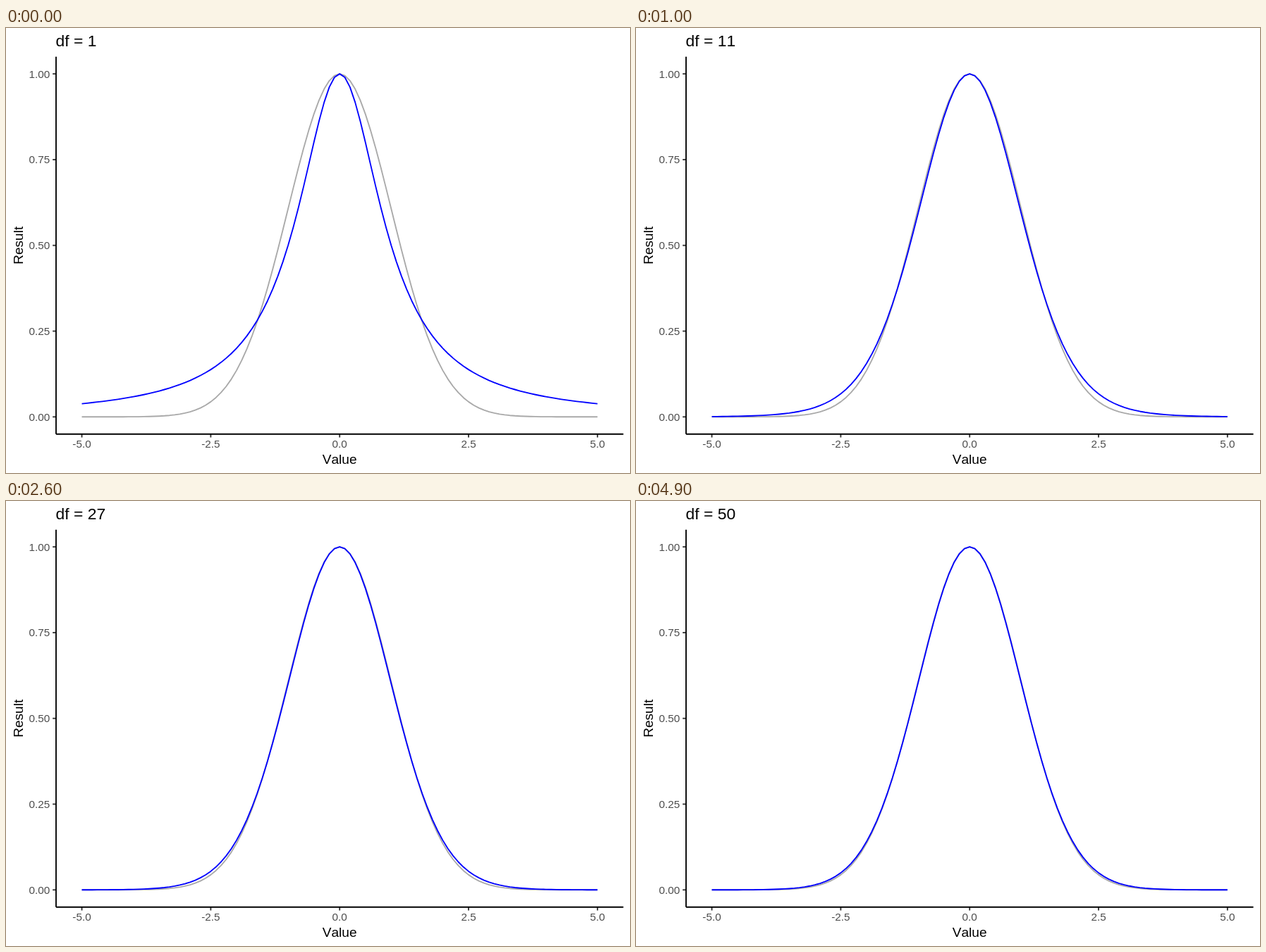
Write an HTML page that moves like this. It is 885 by 632 pixels and loops after 5 s.

```html
<!DOCTYPE html>
<html lang="en">
<head>
<meta charset="utf-8">
<title>Student t against normal</title>
<style>
html, body { margin: 0; width: 100%; height: 100%; overflow: hidden; background: #fff; }
svg { display: block; font: 15.3px "Liberation Sans", Arial, sans-serif; font-kerning: none; }
path { fill: none; stroke-width: 1.86; stroke-linejoin: round; }
#ticks text { fill: #4d4d4d; }
.label { font-size: 19.1px; text-anchor: middle; }
</style>
</head>
<body>
<svg width="885" height="632" viewBox="0 0 885 632">
  <path id="normal" stroke="#a9a9a9"/>
  <path id="student" stroke="#00f"/>
  <g id="ticks"></g>
  <path stroke="#000" d="M71 40.8V576.7M71 576.7H875.6"/>
  <text id="title" x="70.6" y="26" font-size="22.9"></text>
  <text class="label" x="473.2" y="619">Value</text>
  <text class="label" transform="translate(23.6 308.8) rotate(-90)">Result</text>
</svg>
<script>
const $ = id => document.getElementById(id);
const px = x => 473.2 + x * 73.13;
const py = y => 552.3 - y * 487.15;

function plot(id, f) {
  const points = Array.from({ length: 101 }, (_, i) => {
    const x = (i - 50) / 10;
    return px(x).toFixed(2) + ' ' + py(f(x)).toFixed(2);
  });
  $(id).setAttribute('d', 'M' + points.join('L'));
}

const tick = (d, x, y, anchor, label) =>
  `<path stroke="#333" d="${d}"/><text x="${x}" y="${y}" text-anchor="${anchor}">${label}</text>`;

let marks = '';
for (let i = 0; i < 5; i++) {
  const x = i * 2.5 - 5, y = i / 4;
  marks += tick(`M${px(x)} 576.7v4.8`, px(x), 596.4, 'middle', x.toFixed(1));
  marks += tick(`M71 ${py(y)}h-4.8`, 62.4, py(y) + 5.5, 'end', y.toFixed(2));
}
$('ticks').innerHTML = marks;
plot('normal', x => Math.exp(-x * x / 2));

// Degrees of freedom step from 1 to 50, one every 100 ms
let shown = 0;
function draw() {
  const df = 1 + Math.floor(performance.now() % 5000 / 100);
  if (df !== shown) {
    shown = df;
    $('title').textContent = 'df = ' + df;
    plot('student', x => (1 + x * x / df) ** (-(df + 1) / 2));
  }
  requestAnimationFrame(draw);
}
draw();
</script>
</body>
</html>
```
